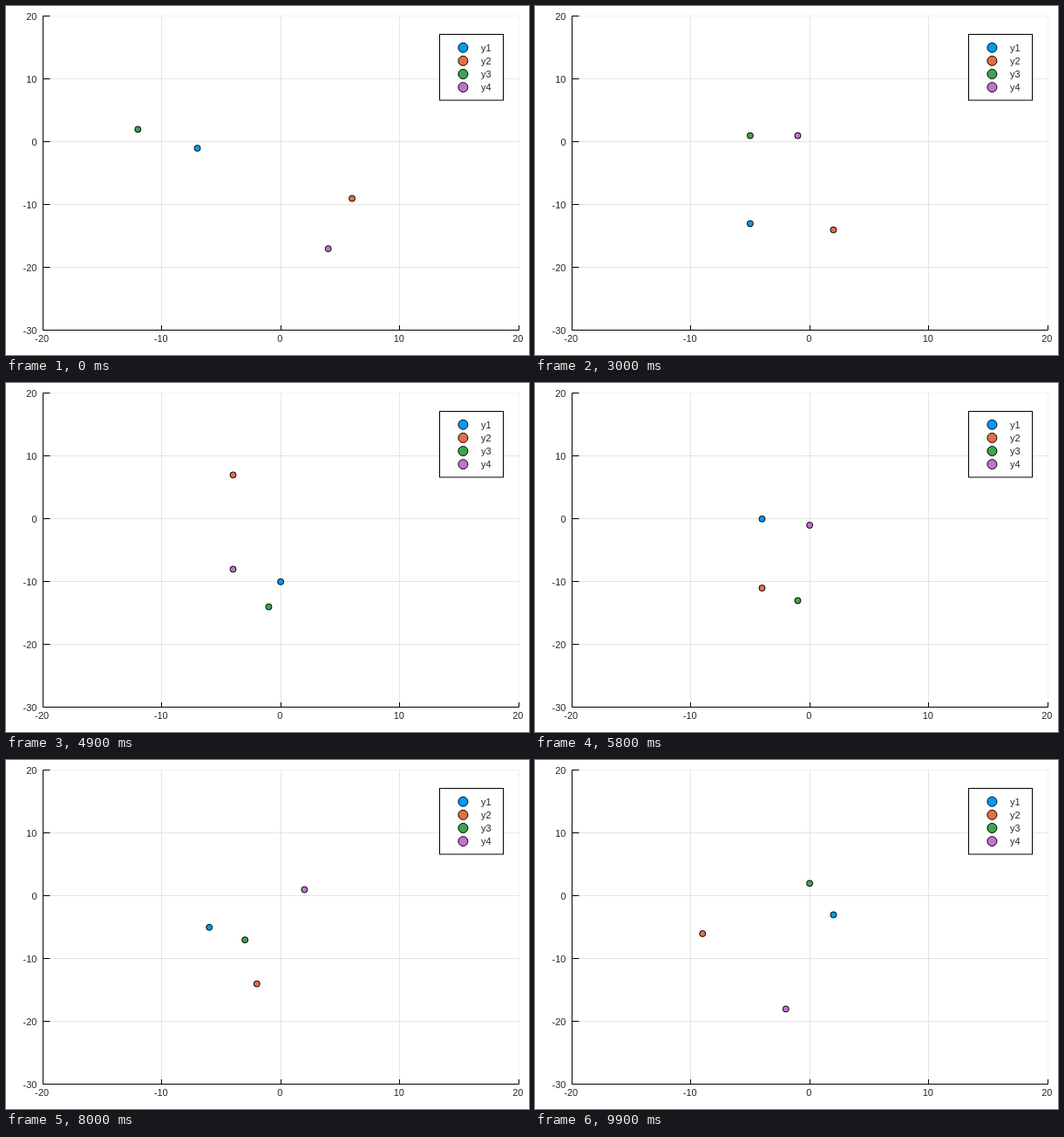
Recreate the animation shown at these times as an HTML page. Size 600 by 400 pixels, loop 10000 ms.

```html
<!DOCTYPE html>
<html lang="en">
<head>
<meta charset="utf-8">
<title>Four bodies</title>
<style>
  html, body { margin: 0; width: 100%; height: 100%; overflow: hidden; background: #fff; }
  svg { display: block; width: 600px; height: 400px; }
  text { font: 11px "Liberation Sans", Arial, sans-serif; fill: #262626; }
  .grid { stroke: #000; stroke-opacity: .1; }
  .edge { stroke-opacity: .05; }
  .axis { stroke: #000; fill: none; }
  circle { stroke: #000; }
</style>
</head>
<body>
<svg id="plot" viewBox="0 0 600 400"></svg>
<script>
const STEP = 100, STEPS = 100;
const COLORS = ["#009afa", "#e36f47", "#3ea44e", "#c371d2"];
const START_X = [-7, 6, -12, 4];
const START_Y = [-1, -9, 2, -17];

const plot = document.getElementById("plot");
const px = x => 315.1 + 13.65 * x;
const py = y => 155.8 - 7.2 * y;
const snap = v => Math.floor(v) + 0.5;

function add(tag, attrs, text) {
  const el = document.createElementNS("http://www.w3.org/2000/svg", tag);
  for (const key in attrs) el.setAttribute(key, attrs[key]);
  if (text !== undefined) el.textContent = text;
  return plot.appendChild(el);
}
const path = (cls, d) => add("path", { class: cls, d });
const label = (x, y, anchor, text) => add("text", { x, y, "text-anchor": anchor }, text);
const dot = (cx, cy, r, fill) => add("circle", { cx, cy, r, fill });

function drawAxes() {
  const left = snap(px(-20)), right = snap(px(20));
  const top = snap(py(20)), bottom = snap(py(-30));
  for (let v = -20; v <= 20; v += 10) {
    const x = snap(px(v));
    if (v > -20) path(v === 20 ? "grid edge" : "grid", `M${x} ${top}V${bottom}`);
    path("axis", `M${x} ${bottom}v-5.5`);
    label(px(v) - 0.8, 385, "middle", v);
  }
  for (let v = -30; v <= 20; v += 10) {
    const y = snap(py(v));
    if (v > -30) path(v === 20 ? "grid edge" : "grid", `M${left} ${y}H${right}`);
    path("axis", `M${left} ${y}h8`);
    label(35.5, py(v) + 4, "end", v);
  }
  path("axis", `M${left} ${top}V${bottom}H${right}`);
}

function drawLegend() {
  add("rect", { x: 497.5, y: 32.5, width: 73, height: 75.5, fill: "#fff", stroke: "#000" });
  COLORS.forEach((color, i) => {
    const y = 47.7 + 15.15 * i;
    dot(524.4, y, 5.5, color);
    label(545, y + 4.3, "start", "y" + (i + 1));
  });
}

// Each body is pulled one unit of speed per step towards every other body.
// The two axes do not affect each other.
function simulate(start) {
  let pos = start, vel = start.map(() => 0);
  const path = [pos];
  while (path.length < STEPS) {
    vel = vel.map((v, i) => pos.reduce((sum, p) => sum + Math.sign(p - pos[i]), v));
    pos = pos.map((p, i) => p + vel[i]);
    path.push(pos);
  }
  return path;
}

drawAxes();
const xs = simulate(START_X), ys = simulate(START_Y);
const bodies = COLORS.map(color => dot(0, 0, 3.5, color));
drawLegend();

function render(time) {
  const step = Math.floor(time / STEP) % STEPS;
  bodies.forEach((body, i) => {
    body.setAttribute("cx", px(xs[step][i]));
    body.setAttribute("cy", py(ys[step][i]));
  });
}

const begin = performance.now();
function tick() {
  render(performance.now() - begin);
  requestAnimationFrame(tick);
}
tick();
</script>
</body>
</html>
```
